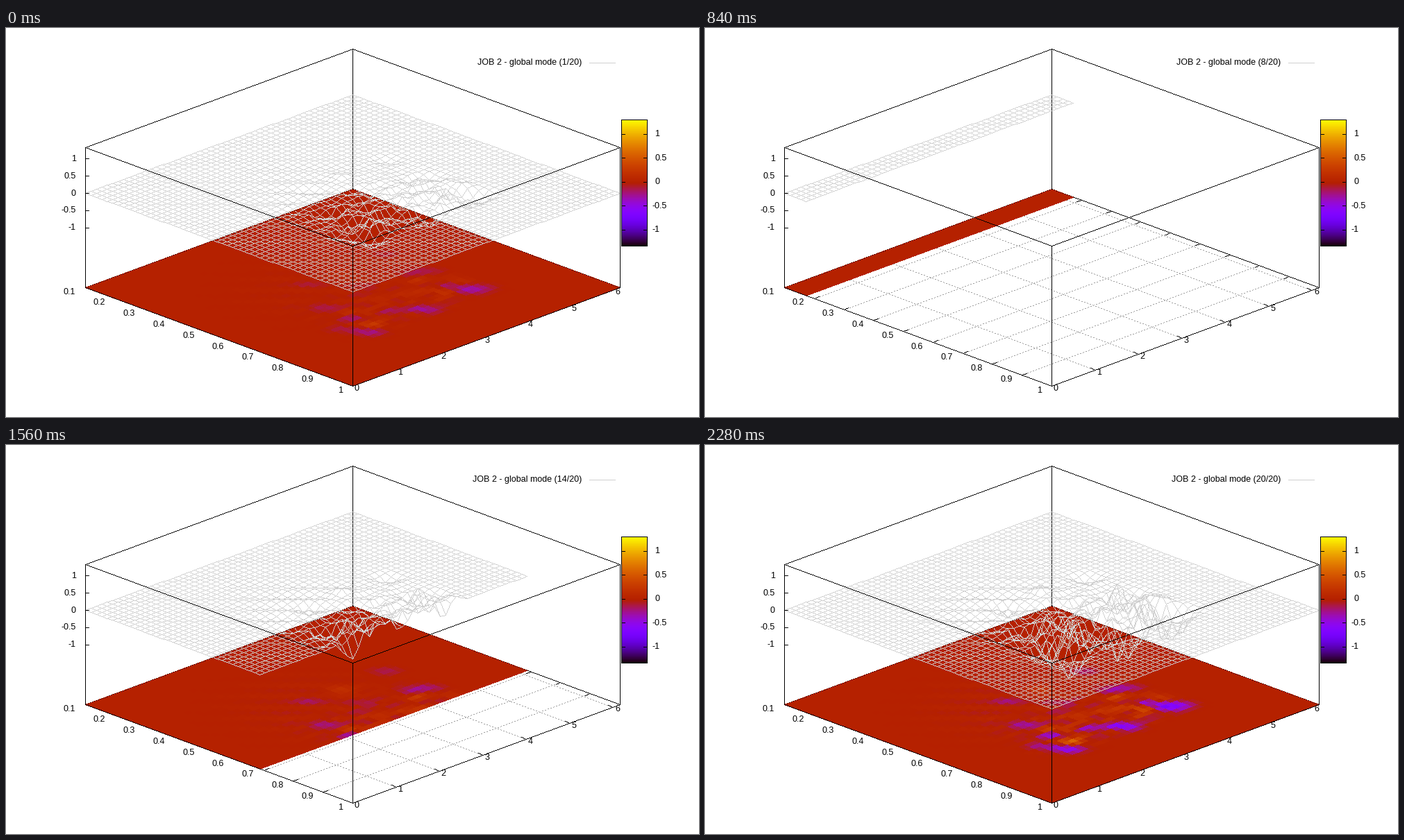
Animation of 998 by 561 pixels, one loop 2.4 s. Source, as a matplotlib script:

```python
import numpy as np
import matplotlib.pyplot as plt
from matplotlib.animation import FuncAnimation
from matplotlib.collections import PolyCollection
from matplotlib.colors import ListedColormap

W, H, DPI = 998, 561, 100
FRAMES, STEP = 20, 120
N = 50                      # samples per axis
Y_MAX = 2 * np.pi * (N - 1) / N
C_MIN, C_MAX = -1.335, 1.31
BASE, ZERO, TOP = 374.5, 238.5, 172.5
BLACK, GRAY, DOTS = (0, 0, 0), (208, 208, 208), (160, 160, 160)

plt.rcParams["font.family"] = "Liberation Sans"
plt.rcParams["font.size"] = 9

fig = plt.figure(figsize=(W / DPI, H / DPI), dpi=DPI, facecolor="white")
ax = fig.add_axes([0, 0, 1, 1])
ax.axis("off")


def project(a, b, level, z=0.0):
    """Unit-square position at a given height level -> pixels."""
    return np.stack([114.5 + 385 * (a + b) + 0 * z,
                     level + 142 * (a - b) - 49.7 * z], axis=-1)


def canvas():
    return np.zeros((H, W, 4), np.uint8)


def stroke(img, p, q, color=BLACK, on=1, period=1):
    """Hard one-pixel lines from each point in p to its partner in q."""
    p = np.floor(np.atleast_2d(p))
    q = np.floor(np.atleast_2d(q))
    count = np.abs(q - p).max(axis=1).astype(int) + 1
    seg = np.repeat(np.arange(len(p)), count)
    k = np.arange(len(seg)) - np.repeat(np.cumsum(count) - count, count)
    t = (k / np.maximum(count - 1, 1)[seg])[:, None]
    xy = np.rint(p[seg] + (q - p)[seg] * t).astype(int)
    x, y = xy[k % period < on].T
    img[y, x] = (*color, 255)


def show(img, z):
    return ax.imshow(img, extent=(0, W, H, 0), aspect="auto",
                     interpolation="nearest", zorder=z)


def label(x, y, s, ha="center"):
    return ax.text(x, y, s, ha=ha, va="center", zorder=2)


def palette(n=256):
    t = np.linspace(0, 1, n)
    blue = np.clip(np.sin(2 * np.pi * t), 0, 1)
    return np.stack([np.sqrt(t), t ** 3, blue], axis=1)


def ramp(t):
    return 1 / (1 + np.exp(-np.clip(t, -40, 40)))


# Bumps of the mode: position on the floor in pixels, then height.
BUMPS = [
    (527, 427, 0.9), (524, 438, -0.85), (605, 406, -0.85), (666, 379, -0.75),
    (684, 375, -0.6), (634, 379, 0.8), (638, 372, -0.75), (608, 350, -0.4),
    (549, 326, -0.25), (485, 353, 0.35), (437, 369, -0.25), (460, 403, -0.4),
    (520, 373, -0.25), (562, 407, -0.4), (487, 433, -0.35), (503, 420, -0.4),
    (600, 364, 0.3), (585, 383, 0.25), (650, 363, 0.3), (505, 409, 0.25),
    (580, 352, -0.25), (545, 392, 0.2),
]


def mode_shape():
    a, b = np.meshgrid(np.linspace(0, 1, N), np.linspace(0, 1, N), indexing="ij")
    s, d = a + b, a - b
    env = ramp((a - 0.53) / 0.04) * ramp((0.77 - a) / 0.01)
    env = env * np.exp(-((b - 0.5) / 0.24) ** 6)
    v = 0.3 * env * np.sin(30 * np.pi * a) * np.cos(2 * np.pi * (5 * b + 2 * a))
    v += 0.12 * env * np.random.default_rng(4).normal(size=a.shape)
    swell = np.exp(-((b - 0.42) / 0.2) ** 2 - ((a - 0.43) / 0.19) ** 2)
    v += 0.09 * swell * np.sin(18 * np.pi * d)
    for x, y, h in BUMPS:
        ds, dd = s - (x - 114.5) / 385, d - (y - 374) / 142
        v += h * np.exp(-(ds / 0.05) ** 2 - (dd / 0.032) ** 2)
    return a, b, np.clip(v, -1.33, 1.1)


A, B, MODE = mode_shape()
FLOOR = project(A, B, BASE)
CELLS = np.stack([FLOOR[:-1, :-1], FLOOR[1:, :-1],
                  FLOOR[1:, 1:], FLOOR[:-1, 1:]], axis=2)


def draw_box(under, over):
    corners = [(0, 0), (1, 0), (1, 1), (0, 1)]
    for i, p in enumerate(corners):
        q = corners[(i + 1) % 4]
        back = i >= 2
        layer = under if back else over
        for level in (TOP, BASE):
            stroke(layer, project(*p, level), project(*q, level))
        stroke(under if p == (0, 1) else over,
               project(*p, TOP), project(*p, BASE))
        if back:
            stroke(over, project(*p, BASE), project(*q, BASE), on=1, period=3)


def draw_axes(under, over):
    tick = 0.018
    dots = dict(color=DOTS, on=2, period=4)
    for i in range(10):
        t = i / 9
        if 0 < i < 9:
            stroke(under, project(t, 0, BASE), project(t, 1, BASE), **dots)
            stroke(under, project(t, 0, BASE), project(t, tick, BASE))
            stroke(under, project(t, 1, BASE), project(t, 1 - tick, BASE))
        label(100.2 + 42.8 * i, 380.5 + 15.8 * i, f"{(i + 1) / 10:g}", "right")
    for i in range(7):
        t = i / Y_MAX
        if i:
            stroke(under, project(0, t, BASE), project(1, t, BASE), **dots)
            stroke(under, project(1, t, BASE), project(1 - tick, t, BASE))
        label(505 + 62.6 * i, 520 - 23.1 * i, str(i))
    for v in (1, 0.5, 0, -0.5, -1):
        y = ZERO - 49.7 * v
        stroke(over, (114.5, y), (119.5, y))
        label(101, y, f"{v:g}", "right")


def draw_colorbar(over):
    x0, x1, y0, y1 = 886, 923, 132, 315
    ax.imshow(palette()[::-1, None], extent=(x0, x1, y1, y0), aspect="auto",
              interpolation="nearest", zorder=5)
    for y in (y0, y1 - 1):
        stroke(over, (x0, y), (x1, y))
    for x in (x0, x1):
        stroke(over, (x, y0), (x, y1 - 1))
    for v in (1, 0.5, 0, -0.5, -1):
        y = 222 - 69 * v
        stroke(over, (x0, y), (x0 + 5, y))
        stroke(over, (x1 - 5, y), (x1, y))
        label(930.7 if v < 0 else 934.2, y, f"{v:g}", "left")


under, over = canvas(), canvas()
draw_axes(under, over)
draw_box(under, over)
draw_colorbar(over)
stroke(over, (840, 50), (877, 50), GRAY)
show(under, 1)
mesh = show(canvas(), 4)
show(over, 6)
title = label(829, 50, "", "right")

floor = PolyCollection([], cmap=ListedColormap(palette()), edgecolors="none",
                       antialiaseds=False, zorder=3)
floor.set_clim(C_MIN, C_MAX)
ax.add_collection(floor, autolim=False)
ax.set_xlim(0, W)
ax.set_ylim(H, 0)


def extent(i):
    """Complete rows, and points in a trailing unfinished row."""
    if not 6 <= i <= 14:
        return N, 0
    front = 5 + 4.72 * (i - 7)
    rows = int(front)
    part = front - rows
    return max(rows, 1), int(part * N) if part > 0.45 else 0


def draw_mesh(surf, rows, extra):
    img = canvas()
    full = surf[:rows]
    stroke(img, full[:, :-1].reshape(-1, 2), full[:, 1:].reshape(-1, 2), GRAY)
    if extra:
        last = surf[rows, :extra]
        stroke(img, last[:-1], last[1:], GRAY)
    elif rows > 1:
        stroke(img, full[:-1].reshape(-1, 2), full[1:].reshape(-1, 2), GRAY)
    return img


def update(i):
    rows, extra = extent(i)
    v = MODE * np.exp(0.042 * (i - FRAMES + 1))
    mesh.set_data(draw_mesh(project(A, B, ZERO, v), rows, extra))

    mean = (v[:-1, :-1] + v[1:, :-1] + v[1:, 1:] + v[:-1, 1:]) / 4
    shown = np.zeros((N - 1, N - 1), bool)
    shown[:rows - 1] = True
    if extra:
        shown[rows - 1, :extra - 1] = True
    floor.set_verts(CELLS[shown])
    floor.set_array(mean[shown])

    title.set_text(f"JOB 2 - global mode ({i + 1}/{FRAMES})")
    return floor, mesh, title


anim = FuncAnimation(fig, update, frames=FRAMES, interval=STEP,
                     repeat=True, repeat_delay=0, blit=False)
plt.show()
```
